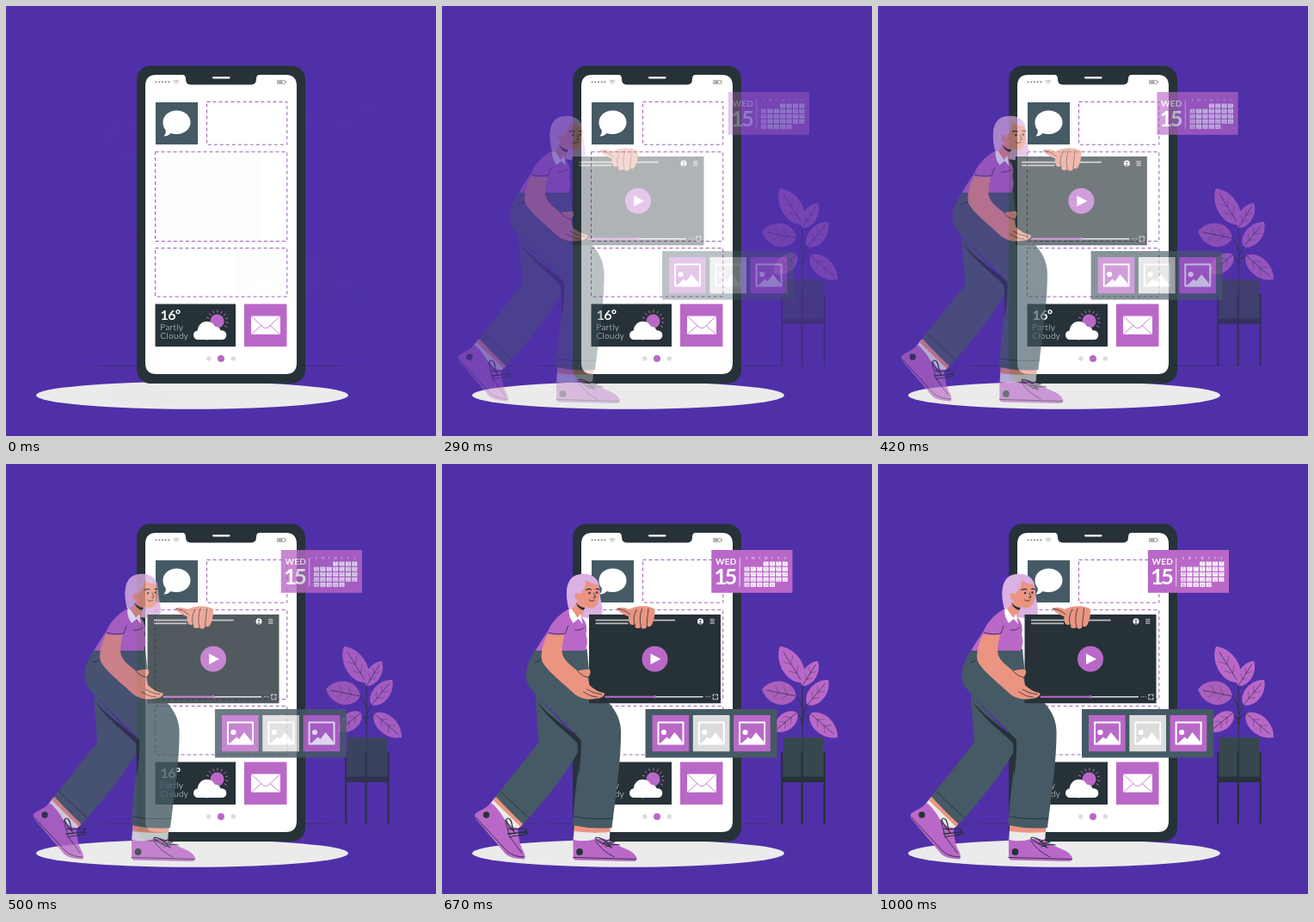
An HTML page that plays this animation: 500x500 px, repeating every 1.04 s.

```html
<!DOCTYPE html>
<html lang="en">
<head>
<meta charset="utf-8">
<title>Mobile widgets</title>
<style>
  html, body { margin: 0; width: 100%; height: 100%; overflow: hidden; background: #5030a8; }
  svg { display: block; width: 100vw; height: 100vh; }
  text { font-family: Lato, "Open Sans", sans-serif; fill: #fff; }
  .dark { fill: #263238; }
  .slate { fill: #455a64; }
  .purple { fill: #ba68c8; }
  .white { fill: #fff; }
  .grey { fill: #dcdcdc; }
  .sock { fill: #ebebeb; }
  .skin { fill: #eb9481; }
  .hair { fill: #dbb0e2; }
  .ink, .line, .lilac { fill: none; stroke: #263238; stroke-linecap: round; stroke-linejoin: round; }
  .line { stroke: #fff; }
  .lilac { stroke: #ba68c8; }
  .slot { fill: none; stroke: #9a62b0; stroke-dasharray: 4 3; }
  .fingers { fill: none; stroke: #eb9481; stroke-width: 8; stroke-linecap: round; }
</style>
</head>
<body>
<svg viewBox="0 0 500 500">
  <path class="dark" d="M47 418.5L250 418L453 418.5L250 419Z"/>
  <ellipse cx="216.5" cy="452.700" rx="181.5" ry="16" fill="#ebebeb"/>

  <g id="plant">
    <path fill="#37474f" d="M397 318H443V364H397Z"/>
    <path class="ink" stroke-width=".8" d="M419.5 320V364"/>
    <path class="dark" d="M394 335h2.4V363.500H417.5V335h2.4V363.500H443.5V335h2.4V418.5h-2.4V370H419.9V418.5h-2.4V370H396.4V418.5H394Z"/>
    <path class="ink" d="M419 318C420 300 419 275 419 250M419 284Q416 272 410 270M419 296Q421 283 427 278M419 302Q418 291 410 290M419 300Q420 291 430 291"/>
    <g id="leaves"></g>
  </g>

  <g id="phone">
    <rect class="dark" x="152" y="69.5" width="196" height="369.5" rx="16"/>
    <path class="white" d="M175 80H205Q209 80 209 85Q209 91.500 215 91.500H285Q291 91.500 291 85Q291 80 295 80H325Q338 80 338 93V415Q338 428 325 428H175Q162 428 162 415V93Q162 80 175 80Z"/>
    <path class="line" stroke-width="2.200" d="M241 83.300H259.500"/>
    <path d="M174.700 88.400H190" fill="none" stroke="#999" stroke-width="2.300" stroke-linecap="round" stroke-dasharray="0 3.650"/>
    <path d="M195 87.500Q198 85 201 87.500M196.500 89Q198 87.800 199.500 89M198 90.300v.1" fill="none" stroke="#aaa" stroke-linecap="round"/>
    <path d="M315.500 86.500h9v4h-9zM325.500 87.500v2" fill="none" stroke="#999" stroke-width=".8"/>
    <path d="M316.500 87.500h5v2h-5z" fill="#888"/>

    <path class="slate" d="M174 112h49v49h-49z"/>
    <path class="white" d="M198.500 121.500C207 121.500 214.500 127 214.500 135.300C214.500 143.500 207 149 198.500 149Q194.500 149 191.500 148Q188 151.500 183.500 151.500Q186.500 148 185.800 144.500C183.500 142 182.500 139 182.500 135.300C182.500 127 190 121.500 198.500 121.500Z"/>
    <path class="slot" d="M233.500 111.500h93.300v49.700h-93.300zM173.500 169.700h153.300v103.800h-153.300zM173.500 281.500h153.300v56.500h-153.300z"/>

    <path class="dark" d="M173.500 346.500H267V396H173.500Z"/>
    <text x="179.500" y="365.300" font-size="16" font-weight="700" letter-spacing="-.6">16º</text>
    <g font-size="9.700" font-weight="300" letter-spacing=".5">
      <text x="179.500" y="377.300">Partly</text>
      <text x="179.500" y="387">Cloudy</text>
    </g>
    <circle class="purple" cx="245.500" cy="366.500" r="8"/>
    <g id="rays" class="lilac" stroke-width="1"></g>
    <g class="white">
      <rect x="218" y="377.300" width="38.300" height="10.700" rx="5.300"/>
      <circle cx="233.500" cy="377.500" r="10.700"/>
      <circle cx="243.500" cy="379" r="6.300"/>
    </g>

    <path class="purple" d="M277 346.500h49.500V396H277Z"/>
    <path class="white" d="M285 360.500h34v21.300h-34z"/>
    <path class="lilac" stroke-width=".8" d="M285.500 361L299 373.500Q302 376 305 373.500L318.500 361M285.500 381.500L297 371.500M318.500 381.500L307 371.500"/>
    <circle class="grey" cx="235.800" cy="410" r="2.700"/>
    <circle class="purple" cx="250" cy="410" r="4"/>
    <circle class="grey" cx="264.300" cy="410" r="2.700"/>
  </g>

  <g id="right">
    <path class="purple" d="M313.800 100H408V149.700H313.800Z"/>
    <text x="318.500" y="116.500" font-size="10" font-weight="700" letter-spacing=".2">WED</text>
    <text x="317" y="140" font-size="25.500" font-weight="700" letter-spacing="-2.700">15</text>
    <path class="line" stroke-width=".7" d="M346.700 109.500V142"/>
    <g id="days" text-anchor="middle"></g>
    <path class="slate" d="M237 285H390V341.500H237Z"/>
    <g id="pictures"></g>
  </g>

  <g id="left">
    <!-- legs and shoes -->
    <path class="sock" d="M61 388L94 417L85 428L54 397Z"/>
    <path class="skin" d="M63 386L95 416L91 422L59 391Z"/>
    <path class="purple" d="M57 394C51 400 45 402 39 406Q36 409 40 414L74 454Q80 459 95 459.500Q97.500 457 94 450C89 442 89 431 87 423Q80 423 72 413Q66 402 57 394Z"/>
    <path class="ink" stroke-width=".9" d="M39 411L75 450Q83 457 95 457M73 414L78 433L92 452"/>
    <path class="ink" stroke-width="1.200" d="M77 424C82 427 96 421 98 425C99 429 84 429 76 430C82 431 99 426 99 429C98 433 84 431 78 434M82 426C76 420 72 412 76 412C82 412 80 424 84 429"/>
    <circle class="dark" cx="51" cy="408" r="3.700"/>
    <path class="slate" d="M108 268L112 324L62 386.500Q76 402 94 419C120 390 148 356 162 326Z"/>
    <path class="ink" stroke-width=".9" d="M68 381Q83 396 100 411"/>

    <path class="sock" d="M153 425L195 426L194 440H152Z"/>
    <path class="skin" d="M153 419H196L195 428Q173 430 153 427Z"/>
    <path class="purple" d="M152 437Q166 440 178 436Q190 434 197 440C208 447 222 448 226 458Q227 462 221 462L154 460.500Q152 460 152 457Z"/>
    <path class="ink" stroke-width=".9" d="M152 457.500L225 459.500M178 438Q185 450 200 457"/>
    <path class="ink" stroke-width="1.200" d="M197 446C190 443 177 437 178 434.500C183 433 192 439 196 446M187 442C193 434 201 437 200 439C198 441 192 441 188 442M190 445Q197 441 206 443"/>
    <circle class="dark" cx="159.500" cy="451" r="3.900"/>
    <path class="slate" d="M109 215C98 231 95 246 99 255C105 268 141 298 161 321C159 354 153 386 151.500 420Q174 425 197 423C202 383 208 341 207.500 310C207 295 200 285 192 276L171 245L168 215Z"/>
    <path class="dark" d="M110 276C124 294 149 309 161 321Q162 338 158 365Q158 338 157 325C146 312 121 296 110 276Z"/>
    <path class="ink" stroke-width=".9" d="M153 410Q176 414 198 412M107 231Q118 228 120 221"/>

    <!-- head and shirt -->
    <path class="hair" d="M147 169C142 150 143 129 163 128C176 127 182 135 183 147C183 159 188 168 185 176Q174 181 162 178Z"/>
    <path class="purple" d="M148 168C138 173 129 181 124 192C117 203 112 210 108.500 217H166C169 210 169 205 167 198Q170 188 163 179Z"/>
    <path class="skin" d="M154 156L166 164L162 179Q155 180 149 168Z"/>
    <path class="white" d="M149 167L158 180L152 185Q147 178 147 170ZM161 174L163 186L157 179Z"/>
    <path class="skin" d="M156 146C155 138 162 134 170 134C179 134 183 143 182.500 153C182 164 177 169 169 167C160 164 156 156 156 146Z"/>
    <path class="hair" d="M149 169C142 151 142 129 162 128C171 127 180 132 182 140C174 140 170 137 167 135C167 146 160 148 157.500 157Q156 165 149 169Z"/>
    <ellipse class="skin" cx="157" cy="154" rx="3" ry="4"/>
    <circle class="dark" cx="171" cy="150" r="1.200"/>
    <circle class="dark" cx="179.500" cy="149.500" r="1.200"/>
    <path class="ink" stroke-width="1.100" d="M167 146.500Q170 144.500 173 146M178.500 145.500Q180.500 144.500 182 146"/>
    <path class="ink" stroke-width=".9" d="M176 150L178 155L175.500 155.500M170.500 158Q174 161 177 158"/>
    <path class="dark" d="M155 161Q160 167 166 167L164 170Q158 169 155 161Z"/>

    <!-- video card -->
    <path class="dark" d="M170.500 175H323.500V278.300H170.500Z"/>
    <path d="M178 181.600H270.500M178 185.300H216" stroke="#bdbdbd" stroke-width="1.700"/>
    <circle class="white" cx="300" cy="183" r="3.500"/>
    <path class="dark" d="M298 185.500q2-3 4 0zM299 182a1 1 0 1 0 2 0a1 1 0 1 0-2 0"/>
    <path class="line" stroke-width=".8" d="M311.500 180.800h4.500M311.500 183h4.500M311.500 185.200h4.500"/>
    <circle class="purple" cx="247" cy="226.700" r="15"/>
    <path class="white" d="M242 220.500L254 226.700L242 233Z"/>
    <path d="M247 270.700H303" stroke="#dcdcdc" stroke-width="1.500"/>
    <path class="lilac" stroke-width="1.900" d="M189.500 270.700H247"/>
    <circle class="purple" cx="247" cy="270.700" r="1.800"/>
    <path class="line" stroke-width="1" stroke-dasharray="0 2.300" d="M306.500 270.700H312"/>
    <path class="line" stroke-width=".8" d="M314.700 270v-2h2M318 268h2v2M320 271.700v2h-2M316.700 273.700h-2v-2"/>

    <!-- arms and hands -->
    <path class="skin" d="M124 195C117 207 114 220 115.500 228C119 239 143 257 152 266C158 272 169 275 177 273C184 273 189 270 188.500 266.500C181 265 175 261 171 257L169 248Q174 243 171 238.500Q163 239 157 240.500C149 234 141 228 139.500 221C138 212 141 204 142.500 195Z"/>
    <path class="purple" d="M129 184C124 190 123 194 122 198Q134 200 144 198L149 183Q139 176 129 184Z"/>
    <path class="ink" stroke-width=".8" d="M123 196Q134 199 143 197L146 188M165 190Q161 194 154 193"/>
    <path class="ink" stroke-width=".8" d="M157 240.500Q162 247 169 248M168 262Q176 267 185 268M164 265Q173 271 180 271"/>
    <path class="skin" d="M202 168Q209 165 217 169Q226 164 238 165.500Q247 167 247 173L239 184L218 178Q207 174 202 168Z"/>
    <path class="fingers" d="M224 171Q219 176 221 183M230 170Q226 179 227.500 187M237 170Q235 180 234 187.500M243 171Q243 179 240 185"/>
    <path class="ink" stroke-width=".8" d="M226 169Q220 179 224 188M232 168Q228 180 231 190M239.500 168Q238 182 237.500 189M204 168.500Q212 169 218 175"/>
  </g>
</svg>
<script>
  const get = id => document.getElementById(id);
  const add = (id, markup) => get(id).insertAdjacentHTML('beforeend', markup);

  // Leaf from its base to its tip; w is the bulge to each side.
  function leaf(x, y, tipX, tipY, w, color = '#ba68c8') {
    const dx = tipX - x, dy = tipY - y, len = Math.hypot(dx, dy);
    const at = (along, side) =>
      `${x + dx * along - dy / len * side} ${y + dy * along + dx / len * side}`;
    const edge = s => `M${at(0, 0)}C${at(.15, s)} ${at(.75, s)} ${at(1, 0)}`;
    let veins = '';
    for (const a of [.25, .5])
      veins += `M${at(a + .15, w * .4)}L${at(a, 0)}L${at(a + .15, -w * .4)}`;
    add('leaves', `<path fill="${color}" d="${edge(w)}${edge(-w)}"/>
      <path class="ink" stroke-width=".7" d="M${at(0, 0)}L${at(.85, 0)}"/>
      <path class="ink" stroke-width=".4" d="${veins}"/>`);
  }
  leaf(419, 254, 393, 212, 16);
  leaf(419, 258, 437, 229, 11);
  leaf(412, 270, 372, 262, 18, '#aa5fbc');
  leaf(425, 280, 449, 251, 13);
  leaf(413, 289, 386, 311, 13);
  leaf(428, 290, 460, 318, 14);

  for (let i = 0; i < 9; i++) {
    const a = (200 + i * 24) * Math.PI / 180, c = Math.cos(a), s = Math.sin(a);
    add('rays', `<path d="M${245.5 + 10.3 * c} ${366.5 + 10.3 * s}l${2.6 * c} ${2.6 * s}"/>`);
  }

  const colX = c => 352 + 7.4 * c;
  [...'SMTWTFS'].forEach((d, c) =>
    add('days', `<text x="${colX(c) + 3}" y="111.3" font-size="3.4">${d}</text>`));
  for (let day = 1; day <= 30; day++) {
    const n = day + 2, x = colX(n % 7), y = 113.6 + 6.1 * Math.floor(n / 7);
    add('days', `<path class="white" opacity="${n % 7 ? 1 : .8}" d="M${x} ${y}h6v4.8h-6z"/>
      <text x="${x + 3}" y="${y + 3.6}" font-size="3.2" style="fill:#ba68c8">${day}</text>`);
  }

  ['purple', 'grey', 'purple'].forEach((tone, i) =>
    add('pictures', `<g transform="translate(${245 + 47.3 * i} 292)">
      <path class="${tone}" d="M0 0H42.7V42.2H0Z"/>
      <path class="line" stroke-width="2" d="M7 8.500H36V33.500H7Z"/>
      <circle class="white" cx="13.500" cy="20" r="3.100"/>
      <path class="white" d="M9 33L17 25.500L20 28L26 20L35 31V33Z"/></g>`));

  // Cubic Bezier easing (.36, -.01, .5, 1.38), with a slight overshoot.
  function ease(t) {
    const curve = (a, b, s) => 3 * (1 - s) ** 2 * s * a + 3 * (1 - s) * s * s * b + s ** 3;
    let low = 0, high = 1;
    for (let i = 0; i < 24; i++) {
      const mid = (low + high) / 2;
      if (curve(.36, .5, mid) < t) low = mid; else high = mid;
    }
    return curve(-.01, 1.38, high);
  }

  function draw() {
    const p = ease(Math.min(1, (performance.now() % 1040 + 30) / 1000));
    const shift = 30 * (1 - p);
    for (const [id, dir] of [['left', -1], ['right', 1], ['plant', 0]]) {
      get(id).setAttribute('transform', `translate(${dir * shift} 0)`);
      get(id).setAttribute('opacity', Math.max(0, Math.min(1, p)));
    }
    requestAnimationFrame(draw);
  }
  draw();
</script>
</body>
</html>
```
